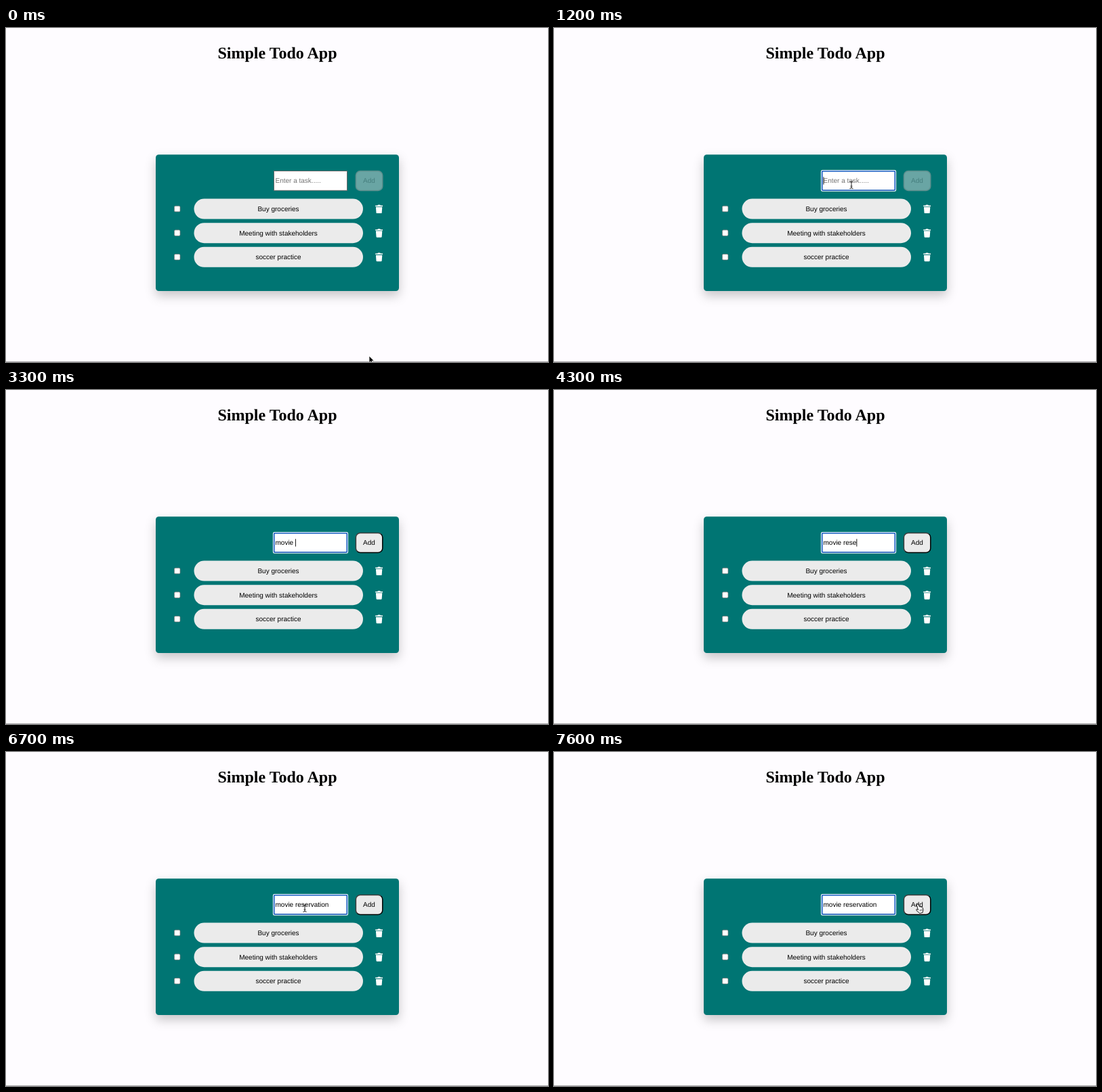
These frames come from a looping animation (800x494 px, 8000 ms). An HTML page:

```html
<!DOCTYPE html>
<html lang="en">
<head>
<meta charset="utf-8">
<title>Simple Todo App</title>
<style>
  html, body { margin: 0; width: 100%; height: 100%; overflow: hidden; background: #fefcff; }
  svg { display: block; width: 800px; height: 494px; }
  text { font: 10px "Liberation Sans", Arial, sans-serif; white-space: pre; text-rendering: geometricPrecision; }
  .title { font: bold 24px "Liberation Serif", "Times New Roman", serif; }
  .middle { text-anchor: middle; }
  .card { filter: drop-shadow(0 7px 8px rgba(0, 0, 0, .22)); }
</style>
</head>
<body>
<svg viewBox="0 0 800 494">
  <defs>
    <linearGradient id="outset" x1="0" y1="0" x2="1" y2="1">
      <stop offset=".49" stop-color="#3c3c3c"/>
      <stop offset=".51" stop-color="#000"/>
    </linearGradient>
    <g id="row">
      <rect x="248.4" y="-4.4" width="8.6" height="8.6" rx="1.6" fill="#fff" stroke="#767676" stroke-width=".75"/>
      <rect x="277.5" y="-15" width="249.5" height="30" rx="15" fill="#ebebeb"/>
      <path d="M545.2-5.2h3.2l.6-1h3.2l.6 1h3.2v1.5h-10.8zM545.9-2.9h9.4l-.6 8.2q-.1 1.2-1.2 1.2h-5.8q-1.1 0-1.2-1.2z" fill="#fff"/>
    </g>
  </defs>

  <rect width="800" height="494" fill="#fefcff"/>
  <rect y="493" width="800" height="1" fill="#a9a8aa"/>
  <text class="title middle" x="400.5" y="45">Simple Todo App</text>
  <rect class="card" x="221" y="187.3" width="359" height="201.7" rx="4.5" fill="#007573"/>

  <rect x="395.5" y="211.5" width="108" height="28.8" fill="#fff" stroke="#6b6b6b"/>
  <g id="focus" fill="none">
    <rect x="394.7" y="210.8" width="109.6" height="30.2" rx="1.5" stroke="#fff" stroke-width="1.6"/>
    <rect x="395.7" y="211.8" width="107.6" height="28.2" rx="1" stroke="#1058c0" stroke-width="1.6"/>
  </g>
  <text id="placeholder" x="397.5" y="229.4" fill="#757575">Enter a task.....</text>
  <text id="typed" x="397.5" y="229.4"></text>
  <rect id="caret" y="220.3" width=".9" height="11.2"/>

  <rect id="button" x="516.4" y="211.6" width="39.4" height="28.8" rx="6.5" stroke-width="1.5"/>
  <text id="label" class="middle" x="536" y="229.4">Add</text>

  <g id="rows"></g>

  <g id="arrow">
    <path d="M0 0v10.2l2.3-2.1 1.6 3.7 1.8-.8-1.6-3.6h3.2z" stroke="#fff" stroke-width=".8"/>
  </g>
  <g id="beam" fill="none">
    <path d="M-2.6-5.2Q0-5.2 0-3.7Q0-5.2 2.6-5.2M0-3.7V4M-2.6 5.4Q0 5.4 0 4Q0 5.4 2.6 5.4M-1.4 2H1.4" stroke="#222" stroke-width="1"/>
  </g>
  <g id="hand">
    <path d="M-2.9-5.6q1-1 1.8.2l1.5 3.4q1-.7 1.7.2 1-.6 1.6.4 1.1-.4 1.5.8l.7 2.5q.3 1.6-.6 3l-.2 1.6-4.6 1.1-.8-1.3q-2.6-1-4-3.7-.2-1.2 1.3-1l1.5 1-2-6.6q-.1-1 .6-1.6z" fill="#fff" stroke="#000" stroke-width=".9" stroke-linejoin="round"/>
    <path d="M.8 2.2l.6 2.4M2.4 1.8l.6 2.4M4 1.4l.5 2.3" stroke="#000" stroke-width=".6"/>
  </g>
</svg>
<script>
  const LOOP = 8000, STEP = 100, FOCUS_AT = 1100, POINTER_BACK = 6500;
  const PHRASE = 'movie reservation';
  const KEY_TIMES = [2000, 2200, 2500, 2700, 2900, 3300, 3500, 3800, 4000,
    4300, 4500, 4900, 5000, 5300, 5500, 5800, 6100];
  // Pointer keys: time, x, y
  const POINTER = [[300, 536, 485], [1000, 439, 232], [6500, 439, 232], [6700, 441, 231], [7400, 539, 231]];

  const el = id => document.getElementById(id);
  const show = (id, on) => el(id).setAttribute('visibility', on ? 'visible' : 'hidden');
  const setAll = (id, attrs) => {
    for (const name in attrs) el(id).setAttribute(name, attrs[name]);
  };
  const ease = p => p * p * (3 - 2 * p);

  el('rows').innerHTML = ['Buy groceries', 'Meeting with stakeholders', 'soccer practice']
    .map((task, i) => `<g transform="translate(0 ${267.6 + 35.6 * i})"><use href="#row"/>` +
      `<text class="middle" x="402" y="3.5">${task}</text></g>`).join('');

  function pointerAt(t) {
    const next = POINTER.findIndex(key => key[0] > t);
    if (next === 0) return POINTER[0].slice(1);
    if (next < 0) return POINTER.at(-1).slice(1);
    const [t0, x0, y0] = POINTER[next - 1], [t1, x1, y1] = POINTER[next];
    const p = ease((t - t0) / (t1 - t0));
    return [x0 + (x1 - x0) * p, y0 + (y1 - y0) * p];
  }

  function pointerShape(x, y) {
    if (y < 211 || y > 241) return 'arrow';
    if (x >= 395 && x <= 504) return 'beam';
    return x >= 516 && x <= 556 ? 'hand' : 'arrow';
  }

  function draw(t) {
    const count = KEY_TIMES.filter(time => time <= t).length;
    const enabled = count > 0, focused = t >= FOCUS_AT;

    el('typed').textContent = PHRASE.slice(0, count);
    show('placeholder', !enabled);
    show('focus', focused);

    const lastInput = enabled ? KEY_TIMES[count - 1] : FOCUS_AT;
    show('caret', focused && (t - lastInput) % 1000 < 500);
    el('caret').setAttribute('x', 397.5 + (enabled ? el('typed').getComputedTextLength() : 0));

    setAll('button', enabled
      ? { fill: '#ebebeb', stroke: 'url(#outset)' }
      : { fill: '#69a5a4', stroke: '#5c8e8d' });
    setAll('label', { fill: enabled ? '#000' : '#467f7e' });

    const [x, y] = pointerAt(t), shape = pointerShape(x, y);
    const visible = !enabled || t >= POINTER_BACK;
    for (const id of ['arrow', 'beam', 'hand']) show(id, visible && id === shape);
    el(shape).setAttribute('transform', `translate(${x} ${y})`);
  }

  const start = performance.now();
  function tick() {
    const t = (performance.now() - start) % LOOP;
    draw(Math.floor(t / STEP) * STEP);
    requestAnimationFrame(tick);
  }
  tick();
</script>
</body>
</html>
```
